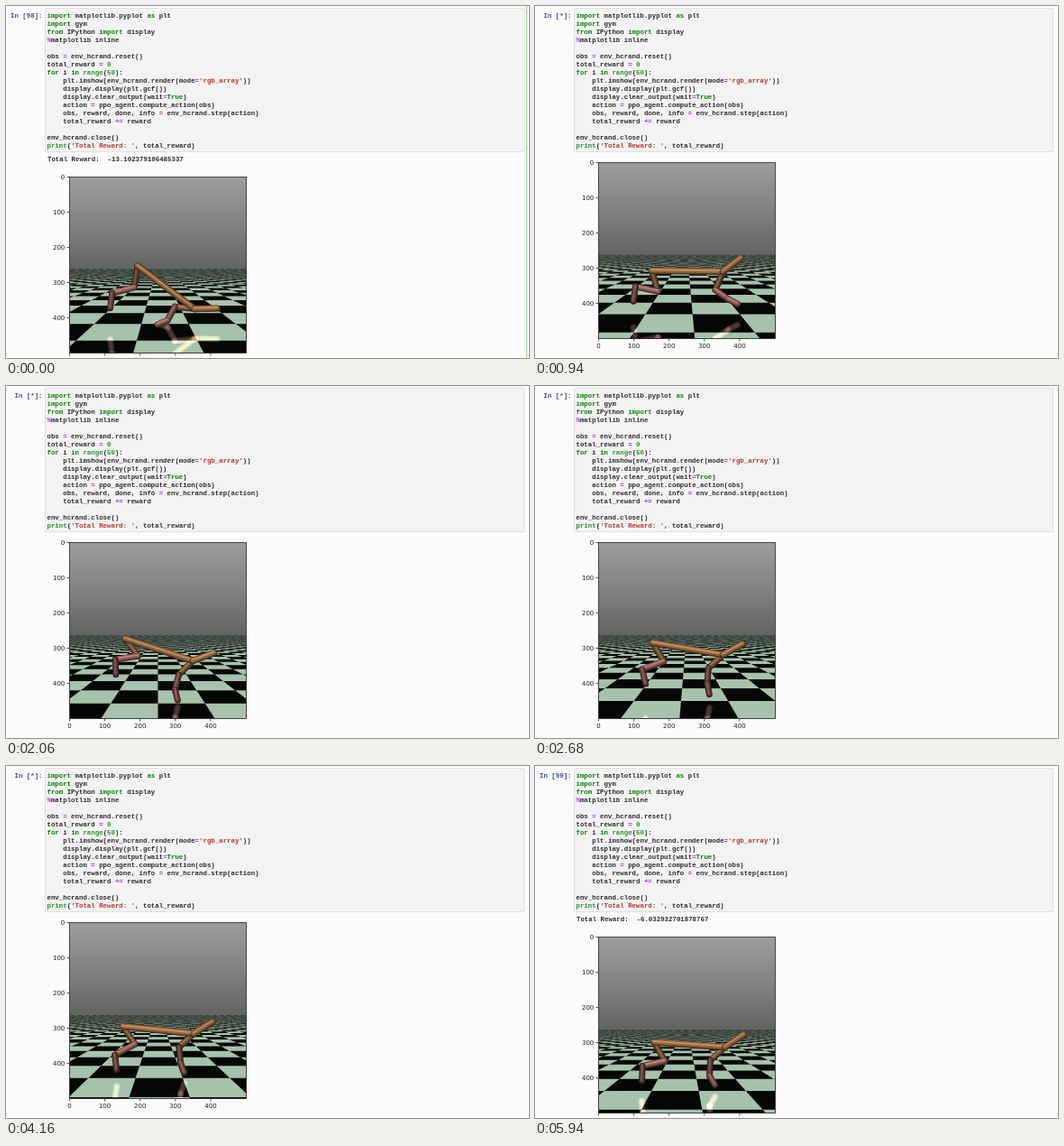
Recreate the animation shown at these times as an HTML page with a canvas. Size 580 by 390 pixels, loop 5960 ms.

```html
<!DOCTYPE html>
<html lang="en">
<head>
<meta charset="utf-8">
<title>Notebook run</title>
<style>
html, body { margin: 0; width: 580px; height: 390px; overflow: hidden; background: #fcfbfd; }
#stage { position: relative; width: 580px; height: 390px; overflow: hidden; }
#cell { position: absolute; left: 42.5px; top: 2px; width: 530px; height: 158px;
  background: #f3f3f3; border: 1px solid #e0e0e2; border-radius: 1px; }
#edge { position: absolute; left: 577px; top: 0; width: 1px; height: 390px; background: #97d29a; }
canvas { position: absolute; left: 0; top: 0; }
pre { position: absolute; margin: 0; color: #2b2b2b; white-space: pre;
  font: bold 7.4px/9px "Courier New", "Liberation Mono", monospace; }
#code { left: 45.5px; top: 7px; }
#prompt { right: 539.5px; top: 6.5px; color: #3f4ba6; }
#out { left: 46px; top: 166px; }
b { color: #087f08; }
i { color: #a52bf5; font-style: normal; }
s { color: #bc3030; text-decoration: none; }
u { color: #2a902a; text-decoration: none; }
</style>
</head>
<body>
<div id="stage">
<div id="cell"></div>
<div id="edge"></div>
<canvas id="plot" width="580" height="390"></canvas>
<pre id="prompt"></pre>
<pre id="code"><b>import</b> matplotlib.pyplot <b>as</b> plt
<b>import</b> gym
<b>from</b> IPython <b>import</b> display
<i>%</i>matplotlib inline

obs <i>=</i> env_hcrand.reset()
total_reward <i>=</i> <u>0</u>
<b>for</b> i <b>in</b> <u>range</u>(<u>50</u>):
    plt.imshow(env_hcrand.render(mode<i>=</i><s>'rgb_array'</s>))
    display.display(plt.gcf())
    display.clear_output(wait<i>=</i><b>True</b>)
    action <i>=</i> ppo_agent.compute_action(obs)
    obs, reward, done, info <i>=</i> env_hcrand.step(action)
    total_reward <i>+=</i> reward

env_hcrand.close()
<u>print</u>(<s>'Total Reward: '</s>, total_reward)</pre>
<pre id="out"></pre>
</div>
<script>
const LOOP = 5960, RUN = 80, FIRST = 300, DONE = 5400, STEP = 104;
const LEFT = 70.5, TOP = 173.5, W = 196, H = 195, CX = 168.5, CY = 271;
const FOCAL = 235.4, DEPTH = 3, TILE = 2 / 3;
const $ = id => document.getElementById(id);
const ctx = $('plot').getContext('2d');
const rad = deg => deg * Math.PI / 180;
const mix = (a, b, k) => a + (b - a) * k;
const stepAt = t => Math.floor((t - FIRST) / STEP);

// hip x, hip y, camera height, floor offset, then angles:
// torso, rear thigh, shin, foot, front thigh, shin, foot
const before = [146, 272, .83, -.35, 37, 99, 165, 97, 186, 118, 158];
const keys = [
  [540, [131, 293, .97, .14, 2, 88, 182, 90, 120, 28, 25]],
  [1360, [128, 293.5, .83, .1, 1.5, 67, 186, 114, 113, 27, 37]],
  [2060, [132, 280, 1.03, 0, 18, 53, 171, 88, 135, 104, 76]],
  [3300, [129, 289, .96, -.25, 4, 50, 154, 75, 123, 90, 92]],
  [5100, [130, 288, .945, -.7, 8, 46, 163, 93, 137, 93, 48]],
  [DONE, [132, 290, .93, -.75, 4, 60, 167, 92, 138, 93, 60]]
].map(([t, pose]) => [stepAt(t), pose]);

function poseAt(n) {
  if (n <= keys[0][0]) return keys[0][1];
  const at = keys.findIndex(k => k[0] >= n);
  if (at < 0) return keys[keys.length - 1][1];
  const [n0, p0] = keys[at - 1], [n1, p1] = keys[at];
  const k = (n - n0) / (n1 - n0), swing = Math.sin(Math.PI * k);
  return p0.map((v, i) => {
    const size = i < 4 ? 0 : i === 4 ? 2 : 8;
    return mix(v, p1[i], k) + size * swing * Math.sin(n * 1.3 + i * 2.1);
  });
}

function limbs(p) {
  const [x, y, , , torso, ...leg] = p;
  const list = [];
  const add = (from, len, deg, kind) => {
    const to = [from[0] + len * Math.cos(rad(deg)), from[1] + len * Math.sin(rad(deg))];
    list.push({ from, to, deg, kind });
    return to;
  };
  const hip = [x, y];
  let end = add(hip, 24, leg[0], 'thigh');
  end = add(end, 25.5, leg[1], 'shin');
  add(end, 16.5, leg[2], 'shin');
  const chest = [x + 79 * Math.cos(rad(torso)), y + 79 * Math.sin(rad(torso))];
  end = add(chest, 22, leg[3], 'thigh');
  end = add(end, 17, leg[4], 'shin');
  add(end, 12, leg[5], 'shin');
  add(hip, 79, torso, 'body');
  add(chest, 25, torso - 38, 'body');
  return list;
}

function stroke(a, b, width, color, dx = 0, dy = 0) {
  ctx.beginPath();
  ctx.moveTo(a[0] + dx, a[1] + dy);
  ctx.lineTo(b[0] + dx, b[1] + dy);
  ctx.lineWidth = width;
  ctx.strokeStyle = color;
  ctx.stroke();
}

const tones = { body: [172, 122, 78], thigh: [152, 108, 76], shin: [168, 110, 101] };

function drawLimb({ from, to, deg, kind }) {
  const light = .62 + .38 * Math.abs(Math.cos(rad(deg)));
  const tone = k => `rgb(${tones[kind].map(c => c * k * light | 0)})`;
  const w = kind === 'body' ? 7.4 : 7;
  stroke(from, to, w, tone(.45));
  stroke(from, to, w - 2.2, tone(.84), -.3, -.7);
  stroke(from, to, 1.7, tone(1.2), -.5, -1.2);
}

function drawFloor(h, shift) {
  const py = d => CY + h * FOCAL / d;
  const far = py(43);
  ctx.fillStyle = '#050705';
  ctx.fillRect(LEFT, far, W, TOP + H - far);
  ctx.beginPath();
  for (let row = -2; row < 60; row++) {
    const d0 = DEPTH + row * TILE, d1 = d0 + TILE;
    const s0 = TILE * FOCAL / d0, s1 = TILE * FOCAL / d1;
    const reach = Math.ceil(.32 * d1) + 1;
    for (let m = -reach; m <= reach; m++) {
      const c = shift - 1 + 2 * m + ((row + 1) & 1);
      ctx.moveTo(CX + c * s0, py(d0));
      ctx.lineTo(CX + (c + 1) * s0, py(d0));
      ctx.lineTo(CX + (c + 1) * s1, py(d1));
      ctx.lineTo(CX + c * s1, py(d1));
      ctx.closePath();
    }
  }
  ctx.fillStyle = '#a7c2aa';
  ctx.fill();
  const haze = ctx.createLinearGradient(0, far, 0, far + 18);
  haze.addColorStop(0, 'rgba(62,70,64,.85)');
  haze.addColorStop(1, 'rgba(40,46,41,0)');
  ctx.fillStyle = haze;
  ctx.fillRect(LEFT, far, W, 18);
  return far;
}

function drawScene(pose) {
  const [, , h, shift] = pose;
  const parts = limbs(pose);
  ctx.save();
  ctx.beginPath();
  ctx.rect(LEFT, TOP, W, H);
  ctx.clip();
  const sky = ctx.createLinearGradient(0, TOP, 0, 277);
  sky.addColorStop(0, '#9d9d9d');
  sky.addColorStop(.5, '#828282');
  sky.addColorStop(1, '#626262');
  ctx.fillStyle = sky;
  ctx.fillRect(LEFT, TOP, W, H);
  const far = drawFloor(h, shift);
  ctx.lineCap = 'round';

  // mirror image in the floor
  const ground = CY + h * FOCAL / DEPTH;
  ctx.save();
  ctx.beginPath();
  ctx.rect(LEFT, far, W, H);
  ctx.clip();
  ctx.globalCompositeOperation = 'lighter';
  for (const { from, to, kind } of parts) {
    const a = [from[0], 2 * ground - from[1]], b = [to[0], 2 * ground - to[1]];
    stroke(a, b, 6.6, kind === 'shin' ? 'rgb(52,35,34)' : 'rgb(52,38,27)');
    stroke(a, b, 2.6, 'rgb(22,16,15)');
  }
  ctx.restore();
  parts.forEach(drawLimb);
  ctx.restore();
}

function drawAxes() {
  ctx.strokeStyle = '#222';
  ctx.lineWidth = .8;
  ctx.strokeRect(LEFT, TOP, W, H);
  ctx.fillStyle = '#202020';
  ctx.font = '7px "DejaVu Sans", sans-serif';
  ctx.textBaseline = 'middle';
  for (let i = 0; i < 5; i++) {
    const x = LEFT + i * 39.1, y = TOP + i * 39;
    stroke([LEFT - 3, y], [LEFT, y], .8, '#333');
    stroke([x, TOP + H], [x, TOP + H + 3], .8, '#333');
    ctx.textAlign = 'right';
    ctx.fillText(i * 100, 65.3, y + .3);
    ctx.textAlign = 'center';
    ctx.fillText(i * 100, x, TOP + H + 8.8);
  }
}

function setText(id, text) {
  const el = $(id);
  if (el.textContent !== text) el.textContent = text;
}

function draw(t) {
  const old = t < FIRST, done = t >= DONE;
  setText('prompt', t < RUN ? 'In [98]:' : done ? 'In [99]:' : 'In [*]:');
  setText('out', old ? 'Total Reward:  -13.102379106485337'
    : done ? 'Total Reward:  -6.032932701878767' : '');
  $('edge').style.opacity = t < RUN ? 1 : 0;
  ctx.clearRect(0, 0, 580, 390);
  ctx.save();
  if (old || done) ctx.translate(0, 16);
  drawScene(old ? before : poseAt(stepAt(Math.min(t, DONE))));
  drawAxes();
  ctx.restore();
}

const start = performance.now();
function frame() {
  draw((performance.now() - start) % LOOP);
  requestAnimationFrame(frame);
}
frame();
</script>
</body>
</html>
```
